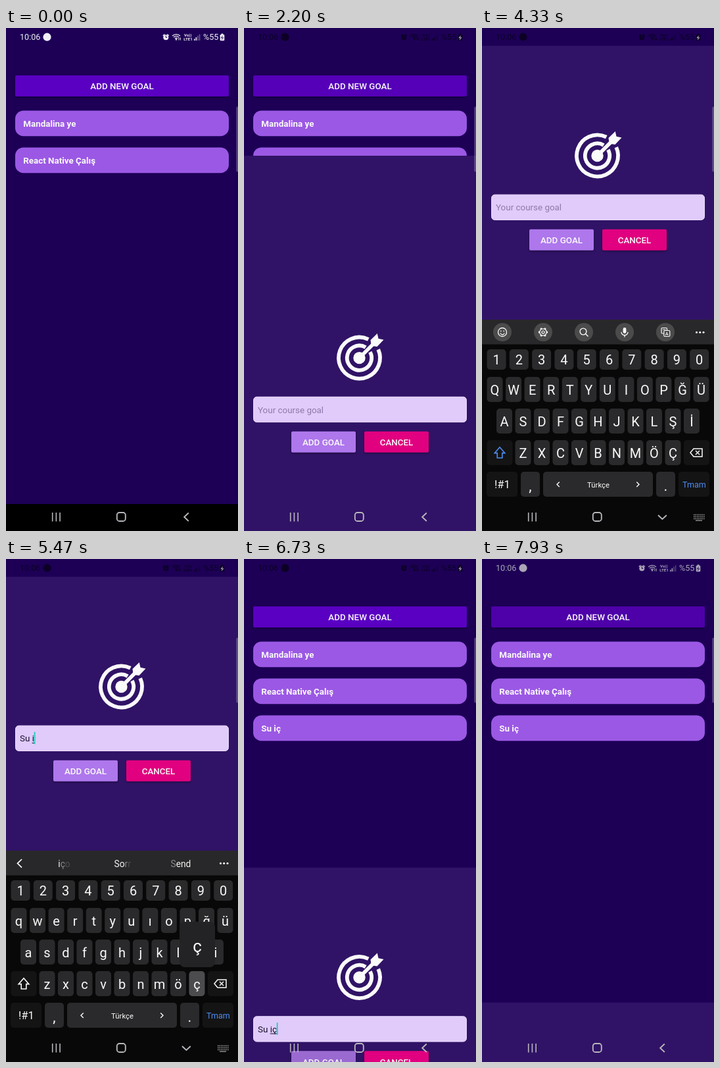
Recreate the animation shown at these times as an HTML page with a canvas. Size 353 by 764 pixels, loop 8000 ms.

```html
<!DOCTYPE html>
<html lang="tr">
<head>
<meta charset="utf-8">
<style>
html, body { margin: 0; width: 100%; height: 100%; overflow: hidden; background: #1d0056; }
canvas { display: block; width: 353px; height: 764px; }
</style>
</head>
<body>
<canvas id="stage"></canvas>
<script>
const W = 353, H = 764, LOOP = 8000;
const BG = '#1d0056', PANEL = '#301366', KEY = '#2a2a2c', DARK_KEY = '#141415', WHITE = '#fafafa', BLUE = '#4c8df0';
const canvas = document.getElementById('stage'), c = canvas.getContext('2d');
const dpr = window.devicePixelRatio || 1;
canvas.width = W * dpr;
canvas.height = H * dpr;

const clamp = v => Math.max(0, Math.min(1, v));
const ramp = (t, from, len) => clamp((t - from) / len);
const ease = p => (1 - Math.cos(Math.PI * p)) / 2;

function box(x, y, w, h, r, fill, stroke, lw = 1) {
  c.beginPath();
  c.roundRect(x, y, w, h, r);
  if (fill) { c.fillStyle = fill; c.fill(); }
  if (stroke) { c.strokeStyle = stroke; c.lineWidth = lw; c.stroke(); }
}
function poly(pts, color, lw, close) {
  c.beginPath();
  for (let i = 0; i < pts.length; i += 2) c.lineTo(pts[i], pts[i + 1]);
  if (close) c.closePath();
  if (lw) { c.strokeStyle = color; c.lineWidth = lw; c.stroke(); }
  else { c.fillStyle = color; c.fill(); }
}
function arc(x, y, r, color, lw, a = 0, b = 360) {
  c.beginPath();
  c.arc(x, y, r, a * Math.PI / 180, b * Math.PI / 180);
  if (lw) { c.strokeStyle = color; c.lineWidth = lw; c.stroke(); }
  else { c.fillStyle = color; c.fill(); }
}
// y is the middle of the capital letters
function text(s, x, y, size, color = WHITE, weight = 400, align = 'center') {
  c.font = `${weight} ${size}px Roboto, sans-serif`;
  c.textAlign = align;
  c.fillStyle = color;
  c.fillText(s, x, y + size * 0.356);
  return c.measureText(s).width;
}
function button(label, x, y, w, h, color, pressed = 0) {
  c.save();
  c.shadowColor = 'rgba(0,0,0,.35)';
  c.shadowBlur = 3 * dpr;
  c.shadowOffsetY = 1.5 * dpr;
  box(x, y, w, h, 2, color);
  c.restore();
  if (pressed) box(x, y, w, h, 2, `rgba(0,0,0,${pressed * 0.13})`);
  text(label, x + w / 2, y + h / 2 + 0.7, 13.4, WHITE, 500);
}
const press = (t, start, hold) => ramp(t, start, 200) * (1 - ramp(t, start + hold, 230));

function statusBar(dark) {
  const mix = (a, b) => Math.round(a + (b - a) * dark);
  const ink = `rgb(${mix(242, 12)},${mix(240, 0)},${mix(246, 38)})`;
  text('10:06', 21, 13.5, 12.6, ink, 400, 'left');
  arc(62.5, 13.7, 6.1, ink);
  // alarm
  arc(243.3, 14.2, 4, ink);
  poly([238.8, 11.8, 241.4, 9.4], ink, 1.4);
  poly([247.8, 11.8, 245.2, 9.4], ink, 1.4);
  poly([243.3, 11.8, 243.3, 14.5, 245.2, 14.5], BG, 1);
  // wifi
  for (const r of [2.8, 5.6, 8.4]) arc(259, 18, r, ink, 1.3, -135, -45);
  arc(259, 17.4, 1.2, ink);
  poly([263, 18.5, 263, 14.5], ink, 1);
  poly([265.3, 14.5, 265.3, 18.5], ink, 1);
  text('Vo))', 276.8, 11, 6, ink, 700);
  text('LTE1', 277, 16.7, 6.2, ink, 700);
  for (let i = 0; i < 4; i++) {
    c.globalAlpha = i < 2 ? 1 : 0.4;
    box(286 + i * 2.6, 16.4 - i * 2.3, 1.5, 2.6 + i * 2.3, 0, ink);
  }
  c.globalAlpha = 1;
  text('%55', 300, 13.5, 12.6, ink, 400, 'left');
  box(327.5, 8.6, 3, 2, 0.5, ink);
  box(325.7, 10, 6.6, 9.2, 1.3, ink);
  poly([329.8, 11.8, 327.2, 15, 330.6, 14.6, 328.2, 17.8], dark > 0.5 ? '#ddd' : BG, 0.9);
}

function navIcons(keys) {
  const ink = '#b8b6bc';
  for (const x of [70.7, 76.4, 82.1]) poly([x, 736, x, 749.5], ink, 1.6);
  box(168.8, 736, 13, 13, 3.8, null, ink, 1.9);
  if (!keys) return poly([277.8, 736.5, 271.2, 742.8, 277.8, 749], ink, 1.9);
  poly([268, 740, 274.4, 746, 280.8, 740], ink, 1.9);
  for (let r = 0; r < 3; r++)
    for (let i = 0; i < 7; i++) box(322 + i * 2.5, 738.5 + r * 3, 1.5, 1.7, 0, '#8c8c8c');
  box(325, 747.3, 10, 1.5, 0, '#8c8c8c');
}

function target(x, y) {
  c.save();
  c.translate(x, y);
  arc(0, 0, 31.5, WHITE, 5.8, -24, 296);
  arc(0, 0, 18.7, WHITE, 5.8, -29, 301);
  arc(0, 0, 9.2, WHITE);
  poly([0, 0, 21, -21], WHITE, 5.6);
  poly([18, -20, 17, -27, 27.3, -37, 29, -29.3, 37, -27.5, 27, -17, 20, -18], WHITE, 0, true);
  c.restore();
}

// typing: glyph, key centre, down, up
const taps = [
  ['S', 62.5, 597, 4470, 4600],
  ['u', 190.8, 549, 4720, 4850],
  [' ', 176, 693, 4950, 5050],
  ['i', 319, 597, 5170, 5300],
  ['ç', 290.5, 645, 5400, 5535]
];
const FOCUS = 3560;

function entry(t) {
  const done = taps.filter(k => t >= k[4]);
  return { value: done.map(k => k[0]).join(''), since: done.length ? done[done.length - 1][4] : FOCUS };
}

function inputBox(t, y) {
  const { value, since } = entry(t);
  box(14.5, y + 0.5, 324, 38.3, 5, '#e0cbfb', '#ebdcff');
  const mid = y + 20;
  let x = 21;
  if (value) {
    const [first, last] = value.split(' ');
    x += text(first + (value.includes(' ') ? ' ' : ''), x, mid, 13.4, '#190f30', 400, 'left');
    if (last || !value.includes(' ')) {
      const from = last ? x : 21;
      if (last) x += text(last, x, mid, 13.4, '#190f30', 400, 'left');
      box(from, mid + 6.3, x - from, 1, 0, '#190f30');
    }
  } else text('Your course goal', x, mid, 13.4, '#9079aa', 400, 'left');
  if (t >= FOCUS && (t - since) % 1000 < 500) box(x - 0.2, mid - 10, 1.8, 18.5, 0, '#22c7ba');
}

function modal(t, dy) {
  const clipped = t >= 3600 && t < 7500, raised = t >= 3740 && t < 7500;
  const height = clipped ? 416.5 : 696, up = raised ? 140 : 0;
  c.save();
  c.translate(0, dy);
  c.beginPath();
  c.rect(0, 27, W, height);
  c.clip();
  box(0, 27, W, height, 0, PANEL);
  target(175.5, 334 - up);
  inputBox(t, 392.7 - up);
  button('ADD GOAL', 72, 445.7 - up, 98, 32, '#ae77ec', press(t, 6200, 500));
  button('CANCEL', 183, 445.7 - up, 98, 32, '#e1007f');
  c.restore();
}

function tools() {
  for (let i = 0; i < 5; i++) arc(31 + i * 62, 462, 14, '#4b4b4c');
  arc(31, 462, 6.5, WHITE, 1.3);
  arc(28.8, 460.3, 0.9, WHITE);
  arc(33.2, 460.3, 0.9, WHITE);
  arc(31, 462.6, 3.2, WHITE, 1.2, 15, 165);
  arc(93, 462, 5.2, WHITE, 1.3);
  arc(93, 462, 2, WHITE, 1.2);
  for (let a = 0; a < 360; a += 60) arc(93, 462, 6.3, WHITE, 1.6, a - 12, a + 12);
  arc(154, 461, 4.9, WHITE, 1.4);
  poly([157.5, 464.5, 161.5, 468.5], WHITE, 1.5);
  box(214.6, 455, 4.8, 9, 2.4, WHITE);
  arc(217, 461.7, 5, WHITE, 1.3, 0, 180);
  poly([217, 466.5, 217, 469.5], WHITE, 1.4);
  box(273, 455.5, 8.5, 8.5, 1.5, null, WHITE, 1.2);
  box(276.8, 459.5, 9, 9, 1.5, '#4b4b4c', WHITE, 1.2);
  text('A', 281.3, 464, 7.5, WHITE, 500);
  poly([275, 458, 279.5, 458], WHITE, 1);
}

// words with the range of letters shown at full strength
function suggestions(t) {
  const set = t < 4850 ? [['S', 0, 9], ['Sen', 0, 9], ['Su', 0, 9]]
    : t < 5330 ? [['Su', 0, 9], ['Sur', 0, 9], ['Sun', 0, 9]]
    : t < 5600 ? [['iço', 0, 1], ['Sorr', 0, 2], ['Send', 1, 4]]
    : [['iç', 0, 9], ['için', 0, 9], ['içi', 0, 9]];
  poly([24, 456, 17.5, 462.3, 24, 468.6], WHITE, 1.7);
  set.forEach(([word, from, to], n) => {
    c.font = '400 13.8px Roboto, sans-serif';
    let x = 88.5 + n * 88.7 - c.measureText(word).width / 2;
    [...word].forEach((ch, i) => {
      const dim = i < from ? from - i : Math.max(0, i - to + 1);
      x += text(ch, x, 462.7, 13.8, ['#f4f4f4', '#8a8a8a', '#505050'][Math.min(dim, 2)], 400, 'left');
    });
  });
}

function keyboard(t, dy) {
  const upper = t < 4600;
  const tap = taps.find(k => t >= k[3] && t < k[4]);
  c.save();
  c.translate(0, dy);
  box(0, 443, W, 321, 0, '#080808');
  box(0, 443, W, 37.5, 0, '#28282a');
  if (upper) tools(); else suggestions(t);
  for (const x of [326.5, 331.7, 337]) arc(x, 462.3, 1.5, WHITE);

  const key = (x, y, w, h, color) => {
    const hit = tap && Math.abs(tap[1] - x) < w / 2 && Math.abs(tap[2] - y) < h / 2;
    box(x - w / 2, y - h / 2, w, h, 5, hit ? '#4c4c4f' : color);
  };
  const row = (chars, x0, pitch, y, w, h) => [...chars].forEach((ch, i) => {
    const x = x0 + i * pitch;
    key(x, y, w, h, KEY);
    text(upper ? ch : ch.toLocaleLowerCase('tr'), x, y + 0.5, 20);
  });
  row('1234567890', 22, 34.3, 503.5, 29, 31);
  row('QWERTYUIOPĞÜ', 19.5, 28.55, 549, 24, 38);
  row('ASDFGHJKLŞİ', 34, 28.5, 597, 24, 38);
  row('ZXCVBNMÖÇ', 62.5, 28.5, 645, 24, 38);

  key(27, 645, 39, 38, DARK_KEY);
  poly([27, 636.8, 34.8, 645.6, 30.8, 645.6, 30.8, 653, 23.2, 653, 23.2, 645.6, 19.2, 645.6], upper ? BLUE : WHITE, 1.6, true);
  key(326.5, 645, 39, 38, DARK_KEY);
  poly([317, 645, 322, 639, 335, 639, 335, 651, 322, 651], WHITE, 1.5, true);
  poly([325, 642, 331, 648], WHITE, 1.4);
  poly([331, 642, 325, 648], WHITE, 1.4);

  key(30.5, 693, 47, 38, DARK_KEY);
  text('!#1', 31, 693.5, 16.6);
  key(73.5, 693, 29, 38, KEY);
  text(',', 73.5, 695.5, 22);
  key(176.5, 693, 167, 38, KEY);
  text('Türkçe', 177, 693.7, 11.3);
  poly([117.8, 689.5, 114, 693.2, 117.8, 697], WHITE, 1.4);
  poly([235.2, 689.5, 239, 693.2, 235.2, 697], WHITE, 1.4);
  key(279.5, 693, 29, 38, KEY);
  text('.', 279.5, 695, 22);
  key(322.5, 693, 47, 38, DARK_KEY);
  text('Tmam', 323, 693.5, 12.6, BLUE);

  if (tap && tap[0] !== ' ') {
    const x = Math.min(tap[1] + 0.5, 321), y = tap[2];
    box(x - 27, y - 94, 54, 69, 8, '#232325');
    text(tap[0], x, y - 57, 26);
  }
  c.restore();
}

function draw(t) {
  c.setTransform(dpr, 0, 0, dpr, 0, 0);
  box(0, 0, W, H, 0, BG);

  const goals = ['Mandalina ye', 'React Native Çalış'];
  if (t > 6400) goals.push('Su iç');
  button('ADD NEW GOAL', 14, 72, 325, 32, '#5a00c2', press(t, 1800, 260) + press(t, 7670, 260));
  goals.forEach((goal, i) => {
    const y = 125.4 + i * 56;
    box(14, y, 325, 38.8, 12.5, '#9b58e4');
    text(goal, 26.3, y + 20.3, 13.4, WHITE, 700, 'left');
  });
  box(0, 723, W, 41, 0, '#000');

  const again = t > 7500, open = again ? 7861 : 1991;
  const shown = ease(ramp(t, open, 307)) - (again ? 0 : ease(ramp(t, 6558, 307)));
  if (shown > 0) modal(t, (1 - shown) * 737);

  const keysIn = 1 - (1 - ramp(t, 3740, 270)) ** 3 - ease(ramp(t, 6540, 150));
  if (keysIn > 0) keyboard(t, (1 - keysIn) * 321);

  statusBar(ramp(t, open + 30, 130) - (again ? 0 : ramp(t, 6880, 120)));
  box(350.3, 119.5, 6, 99, 2, 'rgba(190,180,205,.35)');
  navIcons(keysIn > 0);
}

function frame() {
  draw(performance.now() % LOOP);
  requestAnimationFrame(frame);
}
frame();
</script>
</body>
</html>
```
